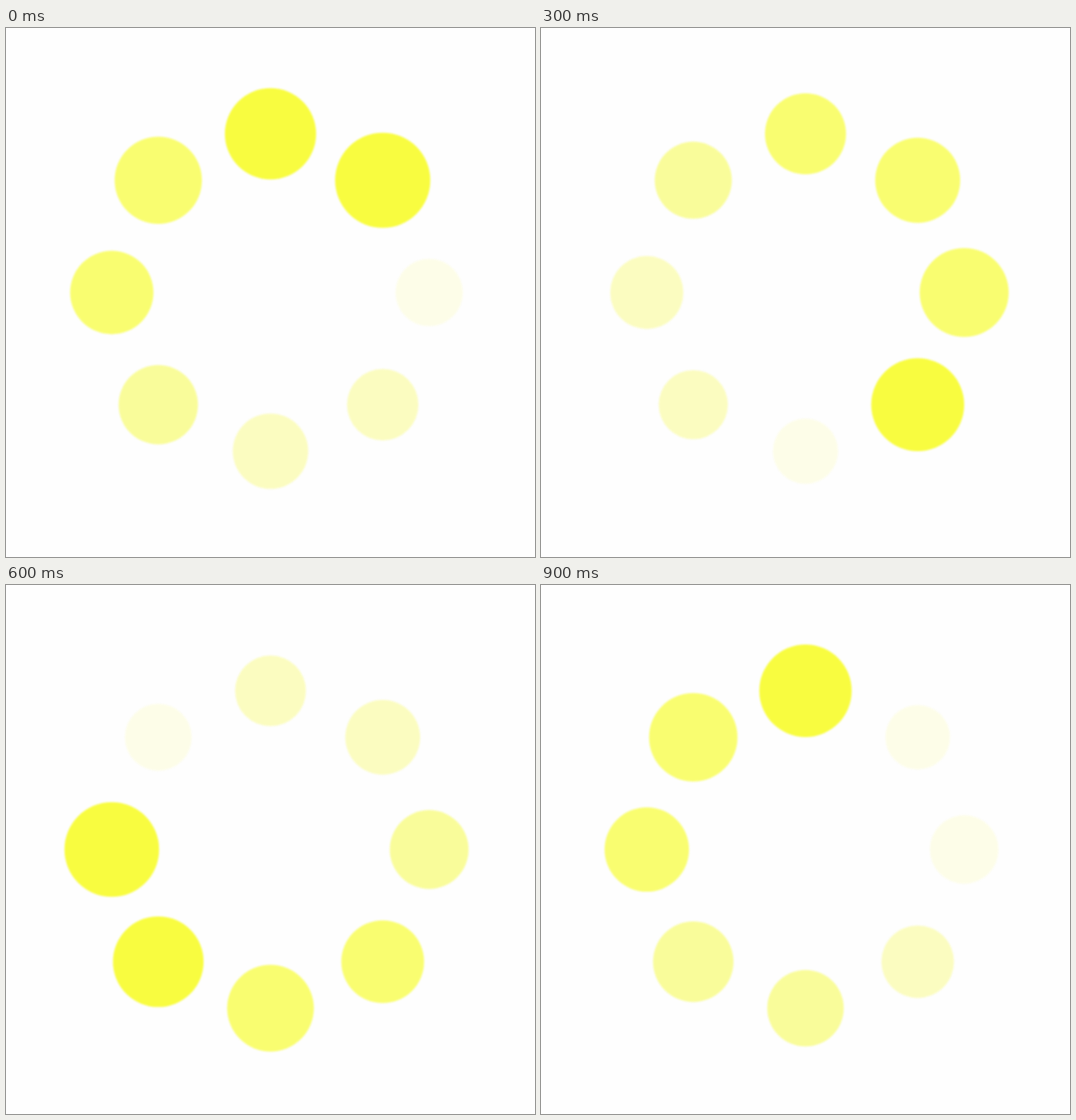
An HTML page with a canvas for the animation above (930 ms loop, 640x640 px).

```html
<!DOCTYPE html>
<html lang="en">
<head>
<meta charset="utf-8">
<title>Spinner</title>
<style>
  html, body { margin: 0; width: 100%; height: 100%; overflow: hidden; background: #fefefe; }
  canvas { display: block; }
</style>
</head>
<body>
<canvas id="stage" width="640" height="640"></canvas>
<script>
const ctx = document.getElementById('stage').getContext('2d');
const LOOP = 930, STEPS = 28, DOTS = 8;
const ORBIT = 192, BIG = 57.6, SMALL = 38.4;

// Fading shades, each used until the given share of a dot's life.
const SHADES = [
  [0.19, '#f8fc40'],
  [0.45, '#f9fd70'],
  [0.6, '#f9fc9a'],
  [0.83, '#fbfcc0'],
  [1, '#fdfde8']
];

// 30 steps per second, switching on whole hundredths of a second.
function stepAt(ms) {
  const tick = Math.floor((ms % LOOP) / 10);
  return Math.floor((tick * 10 + 5) * 0.03);
}

function draw(now) {
  const progress = stepAt(now) / STEPS;
  ctx.clearRect(0, 0, 640, 640);
  for (let i = 0; i < DOTS; i++) {
    const age = (progress - i / DOTS + 1) % 1;
    const angle = (i - 1) * Math.PI / 4;
    ctx.fillStyle = SHADES.find(([until]) => age < until)[1];
    ctx.beginPath();
    ctx.arc(
      320 + ORBIT * Math.cos(angle),
      320 + ORBIT * Math.sin(angle),
      BIG + (SMALL - BIG) * age,
      0, 2 * Math.PI
    );
    ctx.fill();
  }
}

ctx.filter = 'blur(1px)'; // slightly soft edges
const start = performance.now();
function loop() {
  draw(performance.now() - start);
  requestAnimationFrame(loop);
}
loop();
</script>
</body>
</html>
```
